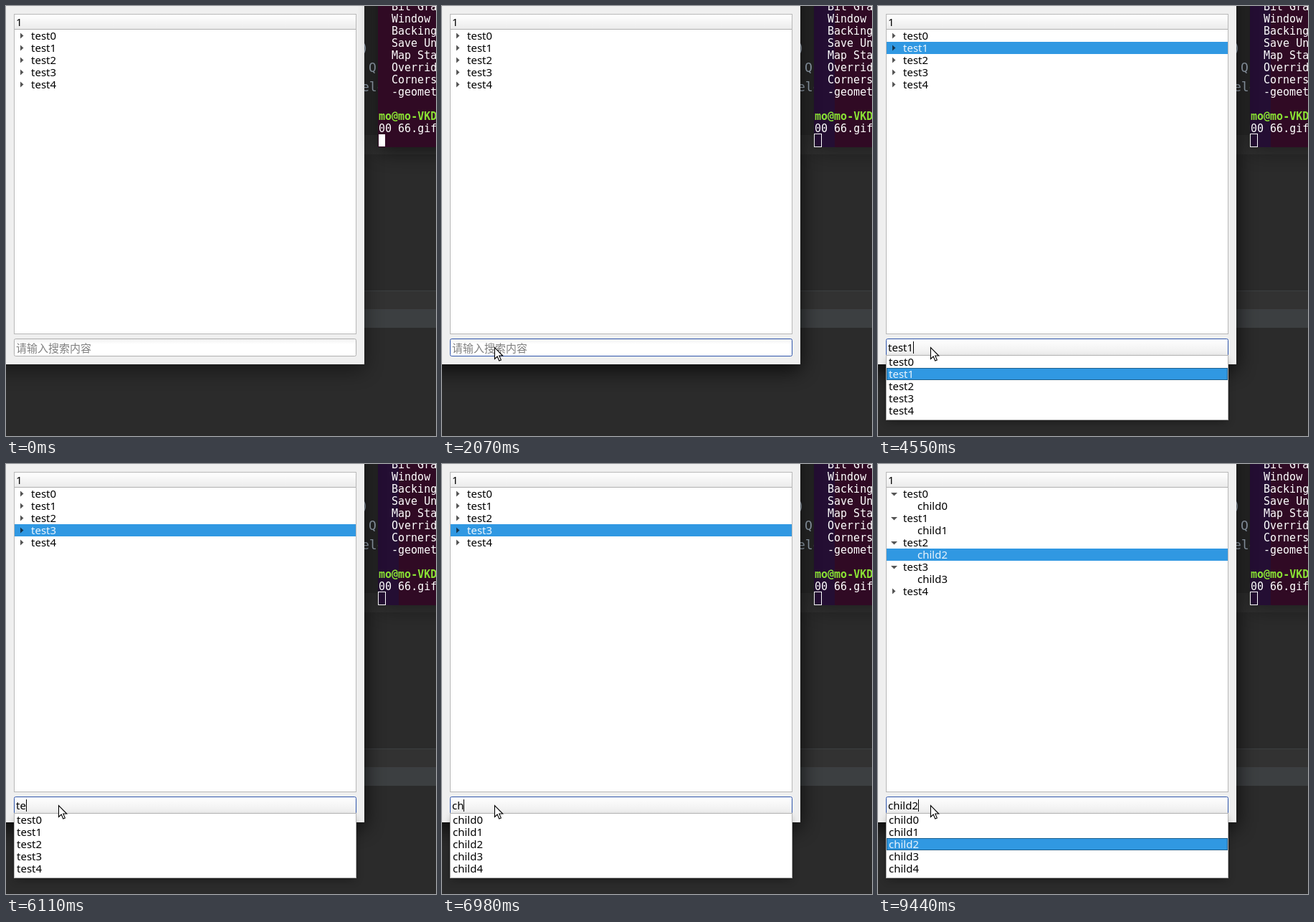
Animation of 600 by 600 pixels, one loop 9.77 s. Source, as an HTML page:

```html
<!DOCTYPE html>
<html lang="zh">
<head>
<meta charset="utf-8">
<title>Tree search</title>
<style>
  html, body { margin: 0; width: 100%; height: 100%; overflow: hidden; background: #2b2b2b; }
  svg { display: block; width: 600px; height: 600px; }
  text { white-space: pre; }
  .ui { font: 15px "Noto Sans", "Noto Sans CJK SC", "Noto Sans CJK", sans-serif; fill: #000; }
  .ui .on { fill: #eaf4fc; }
  .hint { fill: #808080; }
  .term { font: 15px "DejaVu Sans Mono", monospace; fill: #fff; }
  .prompt { font-weight: bold; fill: #8ae234; }
  .code { font: 18px "DejaVu Sans Mono", monospace; fill: #a9b7c6; }
</style>
</head>
<body>
<svg viewBox="0 0 600 600" xmlns="http://www.w3.org/2000/svg">
  <defs>
    <filter id="blur" x="-20%" y="-20%" width="140%" height="140%"><feGaussianBlur stdDeviation="14"/></filter>
    <filter id="soft" x="-20%" y="-40%" width="140%" height="180%"><feGaussianBlur stdDeviation="6"/></filter>
    <linearGradient id="head" x2="0" y2="1"><stop stop-color="#fff"/><stop offset="1" stop-color="#ebebeb"/></linearGradient>
    <linearGradient id="edit" x2="0" y2="1"><stop stop-color="#f0f0f0"/><stop offset=".3" stop-color="#fff"/></linearGradient>
    <linearGradient id="drop" x2="0" y2="1"><stop stop-color="#fff"/><stop offset="1" stop-color="#ececec"/></linearGradient>
  </defs>

  <rect width="600" height="600" fill="#2b2b2b"/>
  <path fill="#323232" d="M500 180h100v27H500zM500 397h100v26H500z"/>
  <path fill="#3c3f41" d="M500 423h100v26H500zM500 397h100v1H500z"/>
  <g class="code">
    <text x="495" y="65">)</text>
    <text x="506" y="92">Q</text>
    <text x="496" y="119">ele</text>
  </g>

  <g id="terminal">
    <rect id="termShadow" x="519" y="-40" width="140" height="243" filter="url(#blur)"/>
    <rect x="519" width="81" height="197" fill="#300a24"/>
    <rect id="tint" x="519" width="29" height="197" fill="#240e33"/>
    <g id="lines" class="term"></g>
    <rect id="block" x="520" y="179" width="9" height="17" fill="#fff"/>
    <rect id="hollow" x="519.5" y="178.5" width="10" height="18" fill="none" stroke="#fff"/>
  </g>

  <g id="app">
    <rect id="appShadow" x="-60" y="-60" width="560" height="568" filter="url(#blur)"/>
    <rect width="500" height="500" fill="#efefef"/>
    <rect x="11.5" y="11.5" width="477" height="446" fill="#fff" stroke="#b8b8b8"/>
    <rect x="12" y="12" width="476" height="20" fill="url(#head)"/>
    <path stroke="#b0b0b0" d="M12 32.5h476"/>
    <g class="ui">
      <text x="14" y="28">1</text>
      <g id="tree"></g>
      <rect id="field" x="11.5" y="464.5" width="477" height="24" rx="2"/>
      <text id="hint" class="hint" x="14" y="483">请输入搜索内容</text>
      <text id="input" x="14" y="482"></text>
      <rect id="caret" y="468" width="1" height="17"/>
    </g>
  </g>

  <g id="popup" class="ui">
    <rect x="13" y="494" width="474" height="86" opacity=".35" filter="url(#soft)"/>
    <rect x="11.5" y="487.5" width="477" height="90" fill="#fff" stroke="#b4b4b4"/>
    <g id="options"></g>
  </g>

  <path id="mouse" d="M.5 .5v16l3.7-3.5 2.6 6 2.6-1.1-2.6-5.9h5z" fill="#fff" stroke="#000" stroke-width="1.1"/>
</svg>
<script>
const LOOP = 9770, ROW = 17, BLUE = '#3098e2';
const el = id => document.getElementById(id);
const show = (id, on) => el(id).setAttribute('visibility', on ? 'visible' : 'hidden');
const set = (id, attrs) => { for (const k in attrs) el(id).setAttribute(k, attrs[k]); };

// Each entry changes part of the state at its time.
const events = [
  [0, { text: '', active: false, caret: false, list: 'test', pick: -1, sel: '', open: 0, pop: 0 }],
  [1340, { active: true, caret: true }],
  [1980, { caret: false }],
  [2110, { text: 't', pop: .35 }],
  [2150, { pop: .75 }],
  [2190, { text: 'te', pop: 1, caret: true }],
  [2750, { caret: false }],
  [2930, { text: 'test0', pick: 0 }],
  [2970, { sel: 'test0' }],
  [3330, { caret: true }],
  [3930, { caret: false }],
  [4510, { caret: true }],
  [4550, { text: 'test1', pick: 1, sel: 'test1' }],
  [4760, { text: 'test2', pick: 2, sel: 'test2' }],
  [4980, { text: 'test3', pick: 3, sel: 'test3' }],
  [5110, { caret: false }],
  [5710, { caret: true }],
  [5770, { text: 'test' }],
  [5810, { pick: -1 }],
  [5950, { text: 'tes' }],
  [6110, { text: 'te' }],
  [6280, { text: 't' }],
  [6460, { text: '', pop: .7 }],
  [6500, { pop: .3 }],
  [6540, { pop: 0 }],
  [6860, { text: 'c', list: 'child' }],
  [6900, { pop: .35 }],
  [6940, { pop: .75 }],
  [6980, { text: 'ch', pop: 1 }],
  [7590, { caret: false }],
  [7690, { text: 'child0', pick: 0 }],
  [7730, { sel: 'child0', open: 1 }],
  [8160, { text: 'child1', pick: 1, sel: 'child1', open: 2 }],
  [8200, { caret: true }],
  [8440, { text: 'child2', pick: 2, sel: 'child2', open: 3 }],
  [8720, { text: 'child3', pick: 3, sel: 'child3', open: 4 }],
  [8810, { caret: false }],
  [9350, { caret: true }],
  [9440, { text: 'child2', pick: 2, sel: 'child2' }]
];

const label = (x, y, s, on) => `<text x="${x}" y="${y}"${on ? ' class="on"' : ''}>${s}</text>`;

function treeMarkup({ open, sel }) {
  let y = 33, out = '';
  const row = (x, name, arrow) => {
    const on = name === sel;
    if (on) out += `<rect x="12" y="${y}" width="476" height="${ROW}" fill="${BLUE}"/>`;
    if (arrow) out += `<path transform="translate(0 ${y})" d="${arrow}" fill="${on ? '#16364f' : '#555'}"/>`;
    out += label(x, y + 14, name, on);
    y += ROW;
  };
  for (let i = 0; i < 5; i++) {
    row(35, 'test' + i, i < open ? 'M18 7h9l-4.5 4.5z' : 'M20 4.5v8l4.5-4z');
    if (i < open) row(55, 'child' + i);
  }
  return out;
}

function optionsMarkup({ list, pick }) {
  let out = '';
  for (let i = 0; i < 5; i++) {
    const y = 488 + i * ROW, on = i === pick;
    if (on) out += `<rect x="12.5" y="${y + .5}" width="475" height="${ROW - 1}" fill="${BLUE}" stroke="#20618f"/>`;
    out += label(15, y + 14, list + i, on);
  }
  return out;
}

function render(s) {
  el('tree').innerHTML = treeMarkup(s);
  el('options').innerHTML = optionsMarkup(s);
  set('popup', { opacity: s.pop });
  set('field', {
    fill: s.pop ? 'url(#drop)' : 'url(#edit)',
    stroke: s.active ? '#3056ac' : '#b0b0b0'
  });
  el('input').textContent = s.text;
  show('hint', !s.text);
  show('caret', s.caret);
  set('caret', { x: 14 + Math.round(s.text ? el('input').getComputedTextLength() : 0) });
  show('tint', s.active);
  show('hollow', s.active);
  show('block', !s.active);
  set('appShadow', { opacity: s.active ? .75 : .45 });
  set('termShadow', { opacity: s.active ? .4 : .6 });
  const [back, front] = s.active ? ['terminal', 'app'] : ['app', 'terminal'];
  el('popup').before(el(back), el(front));
}

// The pointer glides in from the upper right in short hops.
function moveMouse(t) {
  show('mouse', t >= 560);
  const k = Math.min(1, (Math.floor((t - 560) / 46) + 1) / 16);
  const p = 1 - (1 - k) ** 2, q = 1 - p;
  const x = q * q * 525 + 2 * p * q * 260 + p * p * 73;
  const y = q * q * 60 + 2 * p * q * 250 + p * p * 476;
  set('mouse', { transform: `translate(${Math.round(x)} ${Math.round(y)})` });
}

const output = ['Bit Gra', 'Window ', 'Backing', 'Save Un', 'Map Sta', 'Overrid', 'Corners', '-geomet'];
el('lines').innerHTML = output.map((s, i) => label(538, 6 + i * ROW, s)).join('') +
  '<text class="prompt" x="520" y="159">mo@mo-VKD</text>' + label(520, 176, '00 66.gif');

const start = performance.now();
let last = -1;
function tick() {
  const t = (performance.now() - start) % LOOP;
  const past = events.filter(e => e[0] <= t);
  if (past.length !== last) {
    last = past.length;
    render(Object.assign({}, ...past.map(e => e[1])));
  }
  moveMouse(t);
  requestAnimationFrame(tick);
}
tick();
</script>
</body>
</html>
```
